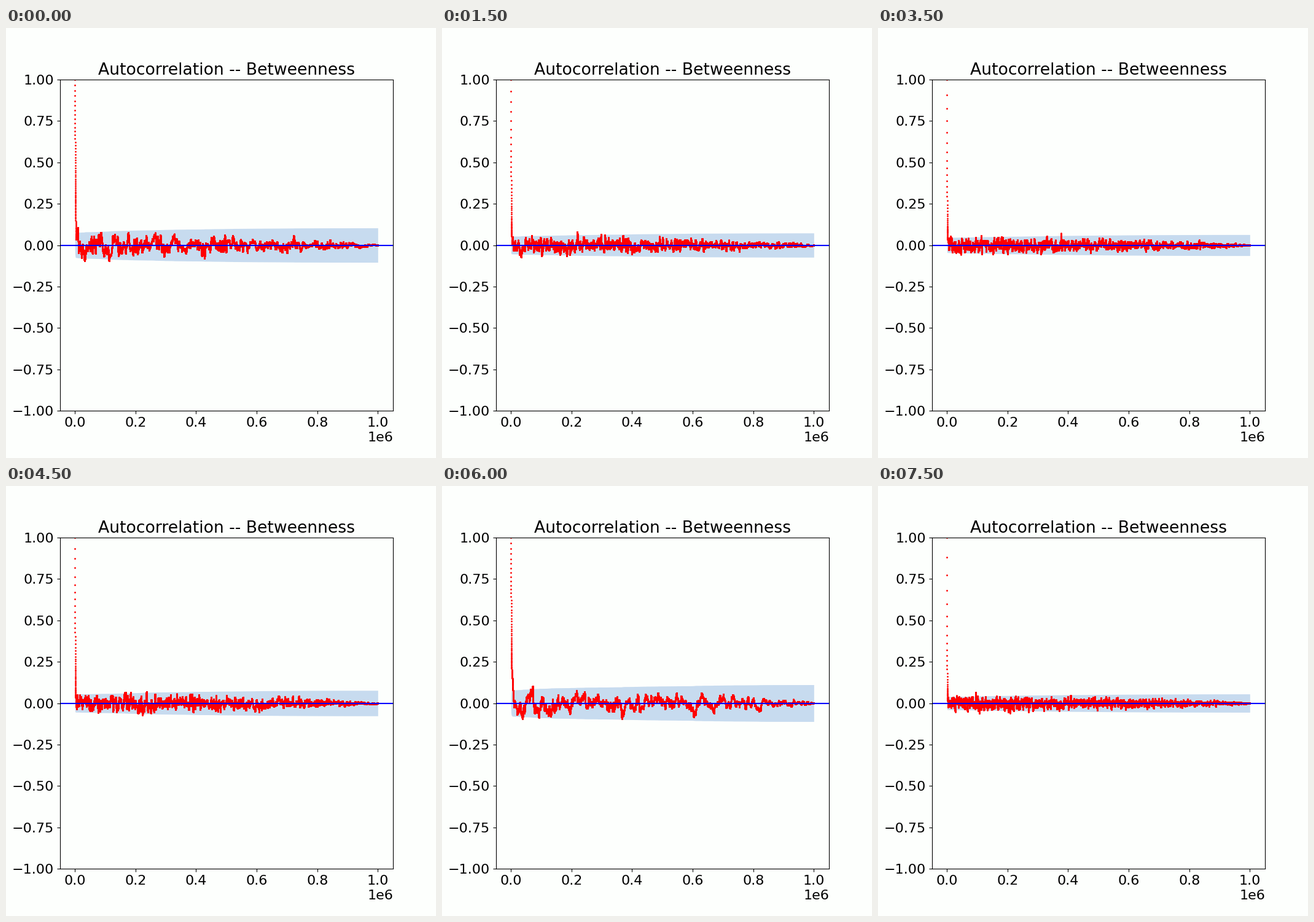
Write a matplotlib script that moves like this. It is 700 px wide and 700 px high and loops after 8 s.

```python
import numpy as np
import matplotlib.pyplot as plt
from matplotlib.animation import FuncAnimation

SAMPLES = 20000
THINNING = 50
STEPS = 16
GROUP = 4
INTERVAL = 500
SLOW_SHARE = 0.1
SLOW_RATE = 0.3
BACKGROUND = "#fdfffd"

lags = np.arange(SAMPLES)
steps = lags * THINNING
omega = 2 * np.pi * np.fft.rfftfreq(SAMPLES)


def lag_one(step):
    """Each group of four chains starts sticky and mixes ever faster."""
    group, place = divmod(step, GROUP)
    drop = 0.036 + 0.05 * (group / 3) ** 0.75
    return 0.966 - drop * (1 - (1 - place / 3) ** 1.4)


def mixing_rates(step):
    """A fast and a slow decay that together give the lag-one value."""
    fast = lag_one(step) ** (1 / (1 - SLOW_SHARE + SLOW_SHARE * SLOW_RATE))
    return (1 - SLOW_SHARE, fast), (SLOW_SHARE, fast ** SLOW_RATE)


def sample_acf(rates, seed):
    """Sample autocorrelation of a sum of seeded autoregressive chains."""
    rng = np.random.default_rng(seed)
    spectrum = 0
    for share, phi in rates:
        noise = np.fft.rfft(rng.standard_normal(SAMPLES))
        spectrum += noise * np.sqrt(share * (1 - phi ** 2)) / (1 - phi * np.exp(-1j * omega))
    chain = np.fft.irfft(spectrum, SAMPLES)
    chain -= chain.mean()
    acf = np.fft.irfft(np.abs(np.fft.rfft(chain, 2 * SAMPLES)) ** 2)[:SAMPLES]
    return acf / acf[0]


def correlation(step):
    rates = mixing_rates(step)
    decay = sum(share * phi ** lags for share, phi in rates)
    return decay + (1 - decay) * (sample_acf(rates, 40 + step) - decay)


def bartlett_band(rho):
    growth = np.concatenate(([0], np.cumsum(rho[1:-1] ** 2)))
    return 1.96 * np.sqrt((1 + 2 * growth) / SAMPLES)


plt.rcParams.update({"font.family": "DejaVu Sans", "font.size": 16})
fig, ax = plt.subplots(figsize=(7, 7), dpi=100, facecolor=BACKGROUND)
ax.set_facecolor(BACKGROUND)
ax.set_title("Autocorrelation -- Betweenness")
ax.set_xlim(-50000, 1050000)
ax.set_ylim(-1, 1)

band = ax.fill_between(steps[1:], 0, 0, color="#c7dbef", linewidth=0)
dots, = ax.plot([], [], "o", color="red", markersize=1)
ax.axhline(0, color="blue", linewidth=1.5)


def update(step):
    rho = correlation(step)
    half = bartlett_band(rho)
    x = steps[1:]
    outline = np.column_stack([np.concatenate([x, x[::-1]]),
                               np.concatenate([half, -half[::-1]])])
    band.set_verts([outline])
    dots.set_data(steps, rho)
    return band, dots


anim = FuncAnimation(fig, update, frames=STEPS, interval=INTERVAL,
                     repeat=True, repeat_delay=0)
plt.show()
```
